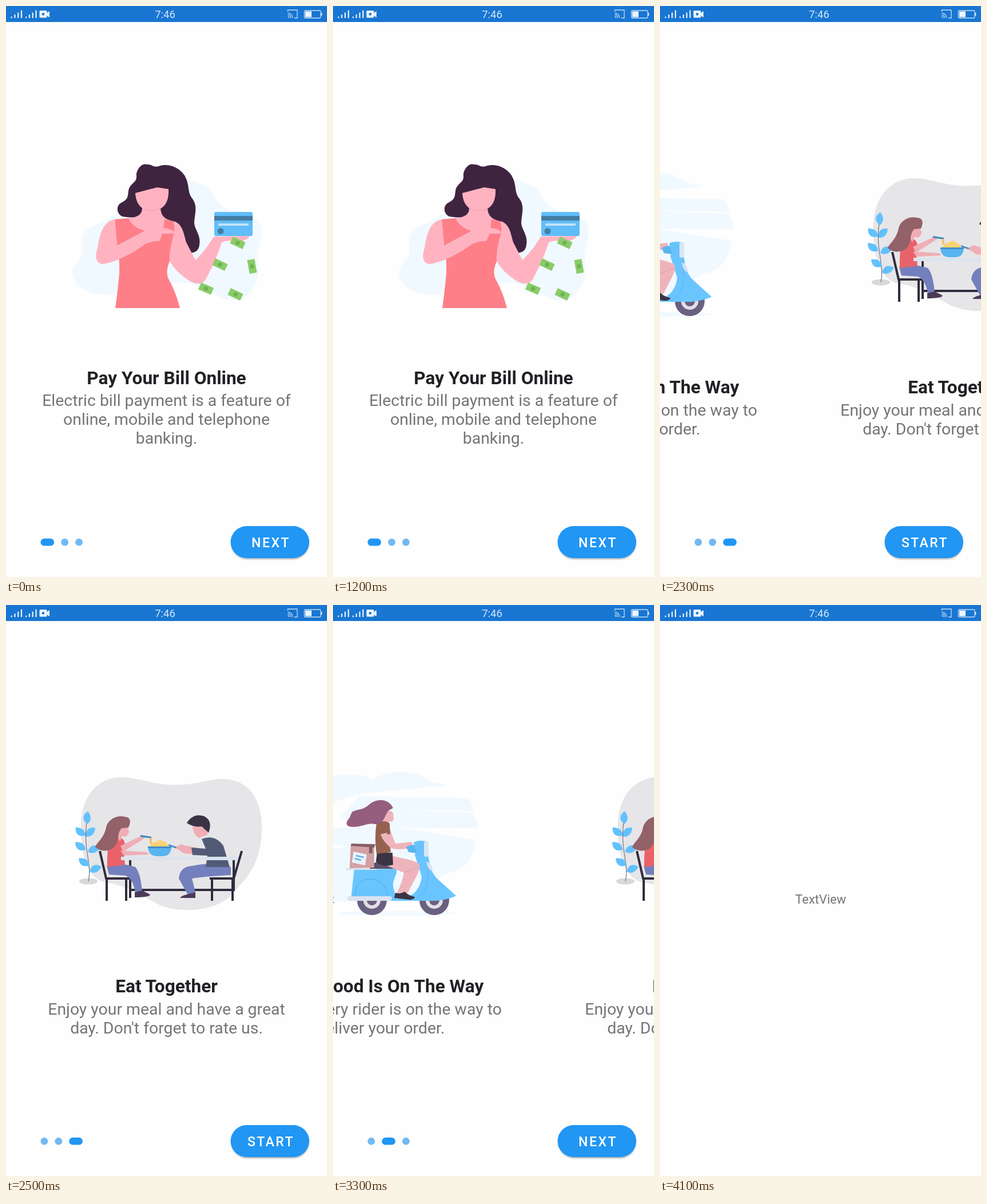
These frames come from a looping animation (561 px wide and 998 px high, 4600 ms). An HTML page:

```html
<!DOCTYPE html>
<html lang="en">
<head>
<meta charset="utf-8">
<title>Onboarding</title>
<style>
html, body { margin: 0; width: 100%; height: 100%; overflow: hidden; background: #fefefe; }
svg { display: block; width: 561px; height: 998px; font-family: Roboto, "Noto Sans", sans-serif; }
text { text-anchor: middle; }
.title { font-size: 31.6px; font-weight: 700; fill: #212125; }
.body { font-size: 28.4px; fill: #757577; }
.label { font-size: 23px; font-weight: 500; letter-spacing: 2.5px; fill: #fff; }
</style>
</head>
<body>
<svg viewBox="0 0 561 998">
  <defs>
    <filter id="blur" x="-20%" y="-40%" width="140%" height="180%"><feGaussianBlur stdDeviation="1.6"/></filter>
    <g id="bill"><path fill="#8acc69" d="M-12-6.5h24v13h-24z"/><circle r="3.6" fill="#6fb150"/></g>
    <path id="leaf" fill="#62c1fd" d="M0 0C-13-1-16-9-12-19C-2-16 3-9 0 0Z"/>
    <g id="wheel"><circle r="26" fill="#6a6080"/><circle r="15" fill="#e0e0e6"/><circle r="9" fill="#6a6080"/></g>
    <path id="sprig" fill="#62c1fd" d="M0 3L-5-2Q-1-2 0 1Q1-2 5-2Z"/>
  </defs>
  <rect width="561" height="998" fill="#fefefe"/>

  <g id="intro">
    <g class="page">
      <path fill="#f0f9ff" d="M115 466C117 447 136 445 134 422C130 400 137 391 158 382C185 371 200 358 230 330C260 300 310 294 346 314C366 318 361 343 383 353C414 365 448 365 447 394C446 419 436 423 441 449C444 490 421 516 395 514C365 512 342 485 310 484C262 482 216 492 196 501C166 511 119 500 115 466Z"/>
      <path fill="#3f2440" d="M228 297C227 288 236 274 246 277C256 276 257 283 267 280C283 274 303 282 312 296C322 313 316 325 326 337C336 351 329 365 329 380C330 391 341 401 338 417C337 430 326 434 314 430C306 440 303 451 294 451Q284 447 288 429L270 372L238 368C222 371 211 369 204 368C193 364 191 348 203 343C216 337 212 328 215 319C219 309 229 308 228 297Z"/>
      <path fill="#ffb3c1" d="M190 373C214 370 238 373 238 353L270 351C270 372 284 374 296 377C309 383 311 399 315 413L331 444C344 432 357 414 363 403L426 402C421 411 407 413 398 411Q386 409 377 413C370 436 359 459 349 478C341 490 326 485 317 478Q296 464 286 446L196 430Z"/>
      <path fill="#ffb3c1" d="M226 327L264 317L284 320C285 342 277 357 255 358C236 358 227 345 226 327Z"/>
      <path fill="none" stroke="#ef9fae" d="M238 353Q255 362 271 353"/>
      <path fill="#ff7f88" d="M190 373L214 371Q223 389 244 393Q268 395 275 388L277 373L292 376Q297 390 291 407Q285 429 286 446Q278 465 284 477Q297 500 304 528H191Q195 501 198 468Q199 440 194 418Z"/>
      <path fill="#ffb3c1" d="M190 373C170 377 164 397 160 423C155 437 156 451 171 451C195 446 222 432 243 416Q260 410 268 411L274 398L294 398C294 390 281 389 272 387C258 385 249 388 241 393L194 418Z"/>
      <path fill="none" stroke="#ef8491" stroke-width="1.2" d="M194 418L241 393M272 399L294 398M225 462Q240 456 255 461"/>
      <rect x="364" y="360" width="67" height="42" rx="3" fill="#60bdf8"/>
      <path fill="#447ca3" d="M364 367h67v8h-67z"/>
      <path fill="#c4e2f5" d="M371 380h53v4h-53z"/>
      <circle cx="375" cy="393.5" r="5.5" fill="#427fa9"/>
      <use href="#bill" transform="translate(405 414) rotate(25)"/>
      <use href="#bill" transform="translate(374 452) rotate(25)"/>
      <use href="#bill" transform="translate(430 455) rotate(80)"/>
      <use href="#bill" transform="translate(349.500 494) rotate(23)"/>
      <use href="#bill" transform="translate(401 504) rotate(25)"/>
      <text class="title" x="280.500" y="660.500">Pay Your Bill Online</text>
      <text class="body" x="280.500" y="699">Electric bill payment is a feature of</text>
      <text class="body" x="280.500" y="732">online, mobile and telephone</text>
      <text class="body" x="280.500" y="765">banking.</text>
    </g>

    <g class="page">
      <g fill="#f0f9ff">
        <path d="M142 361C151 322 178 298 220 296Q246 295 263 305C294 285 340 288 366 309L393 315L237 331Z"/>
        <path d="M240 334L432 338Q438 347 439 360L290 357L438 363Q448 376 446 390L310 389L443 410C440 448 421 464 395 468Q370 478 373 500L300 518H210Q150 511 130 489Q116 465 115 437L225 422L117 412L126 393L250 388L205 372Z"/>
        <ellipse cx="306" cy="539" rx="104" ry="4"/>
      </g>
      <path fill="#62c1fd" d="M154 523C147 497 150 466 189 463C193 481 164 490 159 508Q166 500 176 500Q173 519 154 523C137 519 133 508 135 499Q146 500 152 515Z"/>
      <path fill="none" stroke="#43658a" stroke-width=".8" d="M154 523Q156 491 177 474M154 523L141 506M154 523L170 506"/>
      <use href="#sprig" x="124" y="519"/><use href="#sprig" x="141" y="531"/><use href="#sprig" x="175" y="530"/>
      <path fill="#8d8b96" d="M184 520Q190 512 197 521Z"/>
      <path stroke="#62c1fd" stroke-width="2" d="M190 516L185 511M190 516L195 510"/>
      <use href="#wheel" x="262" y="516"/><use href="#wheel" x="371" y="516"/>
      <path fill="#6ac5ff" d="M231 462L304 461C309 468 298 479 299 491Q301 508 312 513C335 512 347 494 349 475L337 437L343 416L358 424L363 452Q366 470 379 481L409 508Q400 514 374 517H225Z"/>
      <path fill="none" stroke="#54a9e2" d="M233 510C232 488 244 478 262 479Q287 481 289 510"/>
      <path fill="none" stroke="#59b3ed" d="M358 439C362 470 364 499 338 515"/>
      <rect x="219" y="509" width="78" height="8" rx="4" fill="#d8e2ee"/>
      <path fill="#d8e2ee" d="M216 460h54v3h-54zM357 448Q367 451 368 466Q361 463 359 456Z"/>
      <path fill="#58506b" d="M262 452Q278 444 307 461H258Z"/>
      <path fill="#d3a0a3" d="M225 420L266 423V459L223 460Z"/>
      <path fill="#865d68" d="M226 417L268 418L266 424L225 421ZM257 422h6v12h-6z"/>
      <path fill="#e9f2f9" d="M230 431L253 436L250 455L227 450Z"/>
      <path stroke="#59b5ee" stroke-width="2.500" d="M234 438L248 441M232 443L243 446"/>
      <path fill="#efb4bb" d="M287 434C310 444 326 442 344 452C349 463 337 478 326 501L318 510L304 507Q315 485 318 468L284 454Z"/>
      <path fill="none" stroke="#d99ba5" d="M318 468L343 458"/>
      <path fill="#3b3444" d="M271 433H298L299 454Q281 459 269 449ZM303 503Q312 506 319 501Q328 509 337 510Q337 515 327 515L301 512Z"/>
      <path fill="#efb4bb" d="M277 372L290 361Q300 357 300 371Q301 380 291 379L289 386H272ZM278 397L294 393Q299 407 303 417L331 414Q337 421 328 425Q307 429 296 425Q282 413 278 397Z"/>
      <path fill="#96614f" d="M270 382Q285 374 293 382L294 400L282 404Q295 419 295 432L270 435Q266 406 270 382Z"/>
      <path fill="#efb4bb" d="M277 401L288 398Q292 411 301 417L297 426Q282 415 277 401Z"/>
      <path fill="#955e7e" d="M299 355C292 338 270 337 257 349C247 358 238 357 231 360C224 361 227 369 219 377Q214 388 230 388C249 387 256 380 267 383C285 384 283 366 293 358Z"/>
      <path fill="#58b4ee" d="M322 423Q335 415 346 425L341 434L326 432Z"/>
      <path fill="#68c3fd" d="M335 415Q343 410 357 413L355 441L341 438Z"/>
      <rect x="353" y="413" width="8" height="27" rx="3" fill="#d9e6f2"/>
      <text class="title" x="280.500" y="676.500">Your Food Is On The Way</text>
      <text class="body" x="280.500" y="715.500">Our delivery rider is on the way to</text>
      <text class="body" x="277.500" y="748.500">deliver your order.</text>
    </g>

    <g class="page">
      <path fill="#e6e5e8" d="M131 390C129 330 166 300 202 301C240 302 258 317 306 314C348 313 370 296 405 309C447 326 453 381 443 427C433 471 408 490 390 510C365 536 295 541 260 520C224 500 202 488 173 485C140 476 131 434 131 390Z"/>
      <ellipse cx="144" cy="483" rx="16" ry="5.500" fill="#d8d7da"/>
      <path fill="none" stroke="#5c5c68" d="M144 483C151 449 133 427 142 373"/>
      <use href="#leaf" transform="translate(142 383) rotate(35)"/>
      <use href="#leaf" transform="translate(139 403) rotate(-18)"/>
      <use href="#leaf" transform="translate(140 405) rotate(78)"/>
      <use href="#leaf" transform="translate(139 428) rotate(-20)"/>
      <use href="#leaf" transform="translate(143 431) rotate(105)"/>
      <use href="#leaf" transform="translate(146 455) rotate(-25)"/>
      <use href="#leaf" transform="translate(146 466) rotate(100)"/>
      <path fill="none" stroke="#302c3c" stroke-width="4" d="M164 430L175 478H219M176 478V517M210 478V517M217 446V512M219 498H398V446"/>
      <path fill="#7380bd" d="M176 456Q199 449 226 458Q235 468 238 500L226 502Q222 479 209 473L180 471Z"/>
      <path fill="#4c3a57" d="M225 502L238 499L252 506Q251 511 225 511Z"/>
      <path fill="#e96269" d="M181 411Q192 402 204 409Q212 419 206 434L208 454L177 458Q176 430 181 411Z"/>
      <path fill="#efadb5" d="M190 398L202 386Q214 385 215 397Q212 407 203 404L199 413ZM200 421L238 403L243 407L205 431ZM200 429L246 432L250 436L206 438Z"/>
      <path fill="#936168" d="M214 389Q222 371 207 370C194 367 179 374 175 388C172 407 158 416 156 423C166 433 186 431 191 420C200 408 192 403 202 390Z"/>
      <path fill="#3984bd" d="M235 402L254 405V408L235 405Z"/>
      <path fill="none" stroke="#f1c467" stroke-width="4" d="M253 407V417"/>
      <path fill="#fbd174" d="M251 424Q254 413 263 414Q268 407 274 413Q281 412 284 424Z"/>
      <path fill="#58b4ef" d="M248 423H289Q288 439 274 439H262Q249 438 248 423Z"/>
      <path fill="#438fc6" d="M248 422h41v3h-41zM284 418L302 424V427L284 421Z"/>
      <path fill="#7380bd" d="M393 458Q357 448 326 456Q304 457 302 478L318 507L331 502L325 478Q350 474 393 472Z"/>
      <path fill="#efadb5" d="M297 425Q304 415 311 420L357 429V438L311 434ZM326 384Q329 372 345 375L353 401L337 407Q326 401 326 384Z"/>
      <path fill="#515b76" d="M342 409Q365 400 380 421L391 458H349L352 438L326 437L324 424L349 426Z"/>
      <path fill="#383443" d="M316 381Q327 363 346 369Q362 377 354 398L342 387Q328 389 316 381Z"/>
      <path fill="#dbe4ee" d="M201 440h210v6h-210z"/>
      <path fill="none" stroke="#302c3c" stroke-width="4" d="M412 430L398 478H356M396 478V517M360 478V517"/>
      <path fill="#4c3a57" d="M316 506L331 502V512H304Q307 508 316 506Z"/>
      <text class="title" x="280.500" y="676.500">Eat Together</text>
      <text class="body" x="280.500" y="715.500">Enjoy your meal and have a great</text>
      <text class="body" x="280.500" y="748.500">day. Don't forget to rate us.</text>
    </g>

    <g id="dots"></g>
    <rect id="shadow" x="394" y="912" width="135" height="55" rx="27.500" fill="#000" opacity=".3" filter="url(#blur)"/>
    <rect x="392.500" y="909" width="137.500" height="56" rx="28" fill="#2196f3"/>
    <rect id="ripple" x="392.500" y="909" width="137.500" height="56" rx="28" fill="#fff"/>
    <text id="label" class="label" x="463" y="945.500"></text>
  </g>

  <text id="home" x="280.800" y="522" font-size="21.900" fill="#757577">TextView</text>

  <rect width="561" height="28" fill="#1976d2"/>
  <g fill="#eaf4fd">
    <g id="signals"></g>
    <path d="M60 8h10q1.500 0 1.500 1.500V12l4.500-3v11l-4.500-3v2q0 1.500-1.500 1.500H60q-1.500 0-1.500-1.500V9.500Q58.500 8 60 8Z"/>
    <circle cx="65" cy="14.300" r="2.200" fill="#1976d2"/>
    <text x="278" y="21" font-size="18.500" fill="#d6e8f9">7:46</text>
    <path d="M523 9.500h11v10h-11zM550.500 12h1.800v5h-1.800z"/>
    <g fill="none" stroke="#c4dff6" stroke-width="1.300">
      <rect x="521.500" y="8" width="28.500" height="13" rx="1.500"/>
      <path d="M492.500 10V7H509V21H504M492.500 12.500a8.500 8.500 0 0 1 8.500 8.500M492.500 15.500a5.500 5.500 0 0 1 5.500 5.500M492.500 18.500a2.500 2.500 0 0 1 2.500 2.500"/>
    </g>
  </g>
</svg>
<script>
const LOOP = 4600, STEP = 100, WIDTH = 561;
const $ = id => document.getElementById(id);
const pages = [...document.querySelectorAll('.page')];

// Swipe distance past the second page: [ms, px]
const swipe = [
  [1800, 0], [2100, 0], [2200, 110], [2300, 319], [2400, 515], [2500, 561],
  [2700, 561], [2800, 470], [2900, 177], [3000, 45], [3100, 0], [3200, 60],
  [3300, 194], [3400, 425], [3500, 540], [3600, 561]
];

function addRect(parent, attrs) {
  const rect = document.createElementNS('http://www.w3.org/2000/svg', 'rect');
  for (const key in attrs) rect.setAttribute(key, attrs[key]);
  parent.append(rect);
  return rect;
}

for (const left of [8.5, 34])
  [2.5, 6, 9.5, 13.5].forEach((height, i) =>
    addRect($('signals'), { x: left + i * 5.8, y: 21 - height, width: 2.2, height }));

const dots = pages.map(() => addRect($('dots'), { y: 930.8, height: 12.8, rx: 6.4 }));

function scrollAt(t) {
  if (t < 1800) return 0;
  const next = swipe.findIndex(([time]) => time > t);
  if (next < 0) return 2 * WIDTH;
  const [t0, x0] = swipe[next - 1], [t1, x1] = swipe[next];
  return WIDTH + x0 + (x1 - x0) * (t - t0) / (t1 - t0);
}

function selectedAt(t) {
  if (t < 1800) return 0;
  return t < 2300 || (t >= 2900 && t < 3400) ? 1 : 2;
}

function render(t) {
  const scroll = scrollAt(t), selected = selectedAt(t);
  const done = t >= 4000, pressed = t >= 3700;
  $('intro').style.display = done ? 'none' : '';
  $('home').style.display = done ? '' : 'none';
  pages.forEach((page, i) => page.setAttribute('transform', `translate(${i * WIDTH - scroll} 0)`));

  let x = 60.5;
  dots.forEach((dot, i) => {
    const width = i === selected ? 23.6 : 12.8;
    dot.setAttribute('x', x);
    dot.setAttribute('width', width);
    dot.setAttribute('fill', i === selected ? '#2196f3' : '#72b9f3');
    x += width + 12.1;
  });

  $('label').textContent = selected === 2 ? 'START' : 'NEXT';
  $('ripple').setAttribute('opacity', pressed ? 0.15 : 0);
  $('shadow').setAttribute('y', pressed ? 915 : 912);
}

const start = performance.now();
function tick() {
  const t = (performance.now() - start) % LOOP;
  render(Math.floor(t / STEP) * STEP);
  requestAnimationFrame(tick);
}
tick();
</script>
</body>
</html>
```
